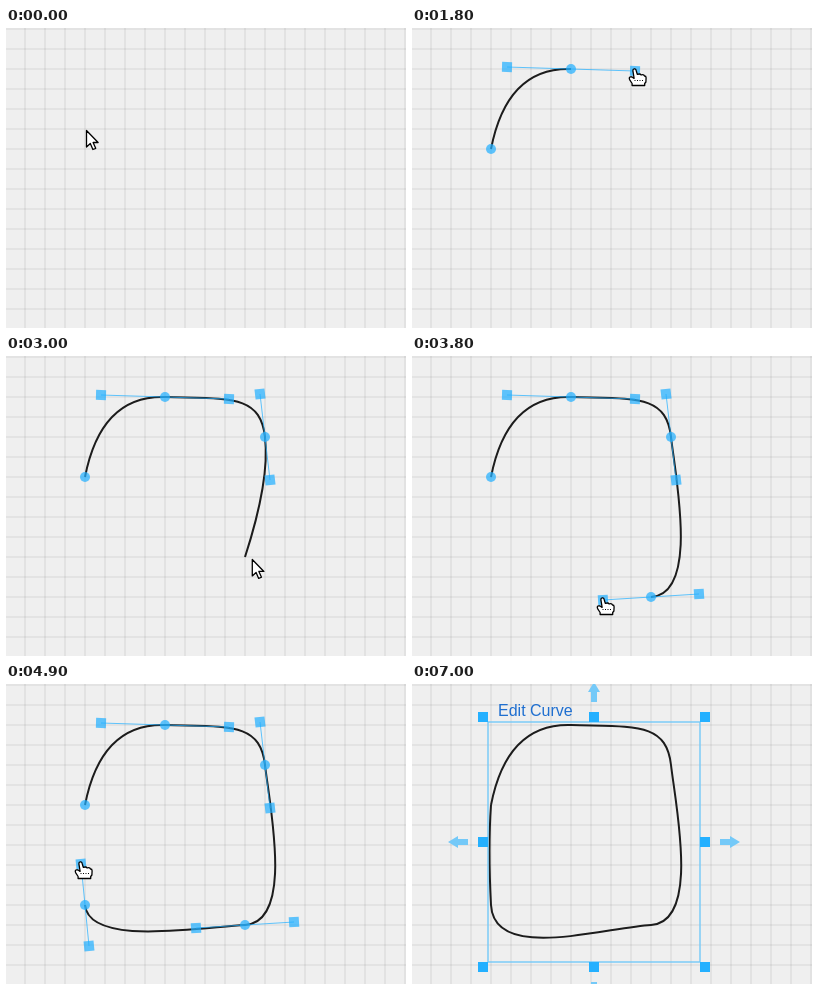
Write an HTML page with a canvas that moves like this. It is 400 by 300 pixels and loops after 8.3 s.

```html
<!DOCTYPE html>
<html lang="en">
<head>
<meta charset="utf-8">
<title>Drawing a curve</title>
<style>
  html, body { margin: 0; width: 100%; height: 100%; overflow: hidden; background: #efefef; }
  canvas { display: block; }
</style>
</head>
<body>
<canvas id="stage" width="400" height="300"></canvas>
<script>
const ctx = document.getElementById('stage').getContext('2d');
const LOOP = 8300, STEP = 100, GRID = 20;
const CLOSED = 5400, SELECTED = 5800;
const BLUE = '#24b0ff', PALE = '#74c9f8', INK = '#1c1c1c';

// Pointer path: time, x, y
const pointerPath = [
  [0, 80, 102], [200, 80, 121], [400, 80, 121], [1400, 160, 41], [1800, 223, 43],
  [2100, 262, 82], [2300, 262, 82], [2500, 264, 124], [3200, 238.5, 234.5],
  [3300, 239, 238], [3800, 191, 244], [3900, 190, 244], [4200, 90, 228],
  [4400, 80, 220], [4900, 75, 180], [5100, 76, 164], [5400, 79, 123],
  [6000, 79, 123], [6900, 78, -10], [7000, 78, -25]
];

// Each node is pressed, its handle is dragged, then released
const nodes = [
  { x: 79, y: 121, press: 300, release: 400, corner: true },
  { x: 159, y: 41, press: 1400, release: 1800 },
  { x: 259, y: 81, press: 2300, release: 2500 },
  { x: 239, y: 241, press: 3400, release: 3900 },
  { x: 79, y: 221, press: 4400, release: 5100 }
];

const arrowShape = new Path2D('M0 0V16.5L3.8 13L6.4 19L9.2 17.8L6.6 12H11.6Z');
const handShape = new Path2D('M-1.6 8L-2.6 1.8C-2.8 -.4 .2 -.8 .6 1.2L1.8 5.4C4 4.6 5.2 5.2 5.6 6C7.4 5.4 8.6 5.8 9 7C10 7 10.6 7.8 10.6 8.8L10.4 13L9.2 14.5V16.5H-3.4V14.5L-5.6 11.2C-6.6 9.6 -6.4 8 -5 7.8C-3.8 7.6 -2.6 8.4 -1.4 9.4Z');
const moveShape = new Path2D('M126 0L116 -6V-3H106V3H116V6Z');

function pointerAt(t) {
  const i = pointerPath.findIndex(p => p[0] >= t);
  if (i < 0) return { x: 78, y: -25 };
  const b = pointerPath[i], a = pointerPath[Math.max(0, i - 1)];
  const k = b[0] === a[0] ? 0 : (t - a[0]) / (b[0] - a[0]);
  return { x: a[1] + (b[1] - a[1]) * k, y: a[2] + (b[2] - a[2]) * k };
}

function snap(p) {
  return {
    x: 19 + GRID * Math.round((p.x - 19) / GRID),
    y: 1 + GRID * Math.round((p.y - 1) / GRID)
  };
}

function withHandles(node, t) {
  if (node.corner) return node;
  const out = pointerAt(Math.min(t, node.release));
  return { ...node, out, back: { x: 2 * node.x - out.x, y: 2 * node.y - out.y } };
}

function strokeLine(x1, y1, x2, y2) {
  ctx.beginPath();
  ctx.moveTo(x1, y1);
  ctx.lineTo(x2, y2);
  ctx.stroke();
}

function drawGrid() {
  ctx.fillStyle = '#efefef';
  ctx.fillRect(0, 0, 400, 300);
  ctx.strokeStyle = 'rgba(0,0,0,.1)';
  ctx.lineWidth = 1;
  for (let x = 19; x < 400; x += GRID) strokeLine(x, 0, x, 300);
  for (let y = 1; y < 300; y += GRID) strokeLine(0, y, 400, y);
}

// Cubic between two handles, quadratic with one, straight with none
function addSegment(a, b) {
  const controls = [a.out, b.back].filter(Boolean);
  const coords = [...controls, b].flatMap(p => [p.x, p.y]);
  const method = ['lineTo', 'quadraticCurveTo', 'bezierCurveTo'][controls.length];
  ctx[method](...coords);
}

function drawCurve(placed, t) {
  if (!placed.length) return;
  const last = placed[placed.length - 1];
  const points = [...placed];
  if (t > last.release) points.push(snap(pointerAt(Math.min(t, CLOSED))));
  ctx.beginPath();
  ctx.moveTo(points[0].x, points[0].y);
  for (let i = 1; i < points.length; i++) addSegment(points[i - 1], points[i]);
  ctx.strokeStyle = INK;
  ctx.lineWidth = 2;
  ctx.stroke();
}

function drawNode(n) {
  ctx.globalAlpha = 0.72;
  ctx.fillStyle = ctx.strokeStyle = BLUE;
  ctx.lineWidth = 1;
  if (!n.corner) {
    strokeLine(n.back.x, n.back.y, n.out.x, n.out.y);
    const angle = Math.atan2(n.out.y - n.y, n.out.x - n.x);
    for (const h of [n.back, n.out]) {
      ctx.save();
      ctx.translate(h.x, h.y);
      ctx.rotate(angle);
      ctx.fillRect(-5, -5, 10, 10);
      ctx.restore();
    }
  }
  ctx.beginPath();
  ctx.arc(n.x, n.y, 5, 0, 2 * Math.PI);
  ctx.fill();
  ctx.globalAlpha = 1;
}

function drawSelection(hover) {
  ctx.strokeStyle = PALE;
  ctx.lineWidth = 1.4;
  ctx.strokeRect(76, 38, 212, 240);
  ctx.fillStyle = BLUE;
  for (const x of [71, 182, 293])
    for (const y of [33, 158, 283])
      if (x !== 182 || y !== 158) ctx.fillRect(x - 5, y - 5, 10, 10);

  ctx.fillStyle = PALE;
  for (let side = 0; side < 4; side++) {
    ctx.save();
    ctx.translate(182, 158);
    ctx.rotate(side * Math.PI / 2);
    ctx.translate(side % 2 ? 34 : 20, 0);
    ctx.fill(moveShape);
    ctx.restore();
  }

  ctx.fillStyle = hover ? BLUE : '#1f6fd0';
  ctx.font = '16px "Liberation Sans", Arial, sans-serif';
  ctx.fillText('Edit Curve', 86, 32);
}

function drawPointer(p, pressing) {
  ctx.save();
  ctx.translate(p.x + 0.5, p.y + (pressing ? -2 : 0.5));
  const shape = pressing ? handShape : arrowShape;
  ctx.fillStyle = '#fff';
  ctx.strokeStyle = '#000';
  ctx.lineWidth = 1.3;
  ctx.lineJoin = 'round';
  ctx.fill(shape);
  ctx.stroke(shape);
  if (pressing) {
    ctx.fillStyle = '#000';
    for (const x of [-1, 1.5, 4, 6.5]) ctx.fillRect(x, 11, 1, 1);
  }
  ctx.restore();
}

function draw(t) {
  const pointer = pointerAt(t);
  const placed = nodes.filter(n => t >= n.press).map(n => withHandles(n, t));
  const pressing = nodes.some(n => t >= n.press && t <= n.release) ||
    (t >= CLOSED && t < SELECTED - STEP);

  drawGrid();
  drawCurve(placed, t);
  if (t >= SELECTED) drawSelection(pointer.y > 14 && pointer.y < 38);
  else if (placed.length > 1) placed.forEach(drawNode);
  drawPointer(pointer, pressing);
}

function tick() {
  const t = performance.now() % LOOP;
  draw(Math.floor(t / STEP) * STEP);
  requestAnimationFrame(tick);
}
tick();
</script>
</body>
</html>
```
